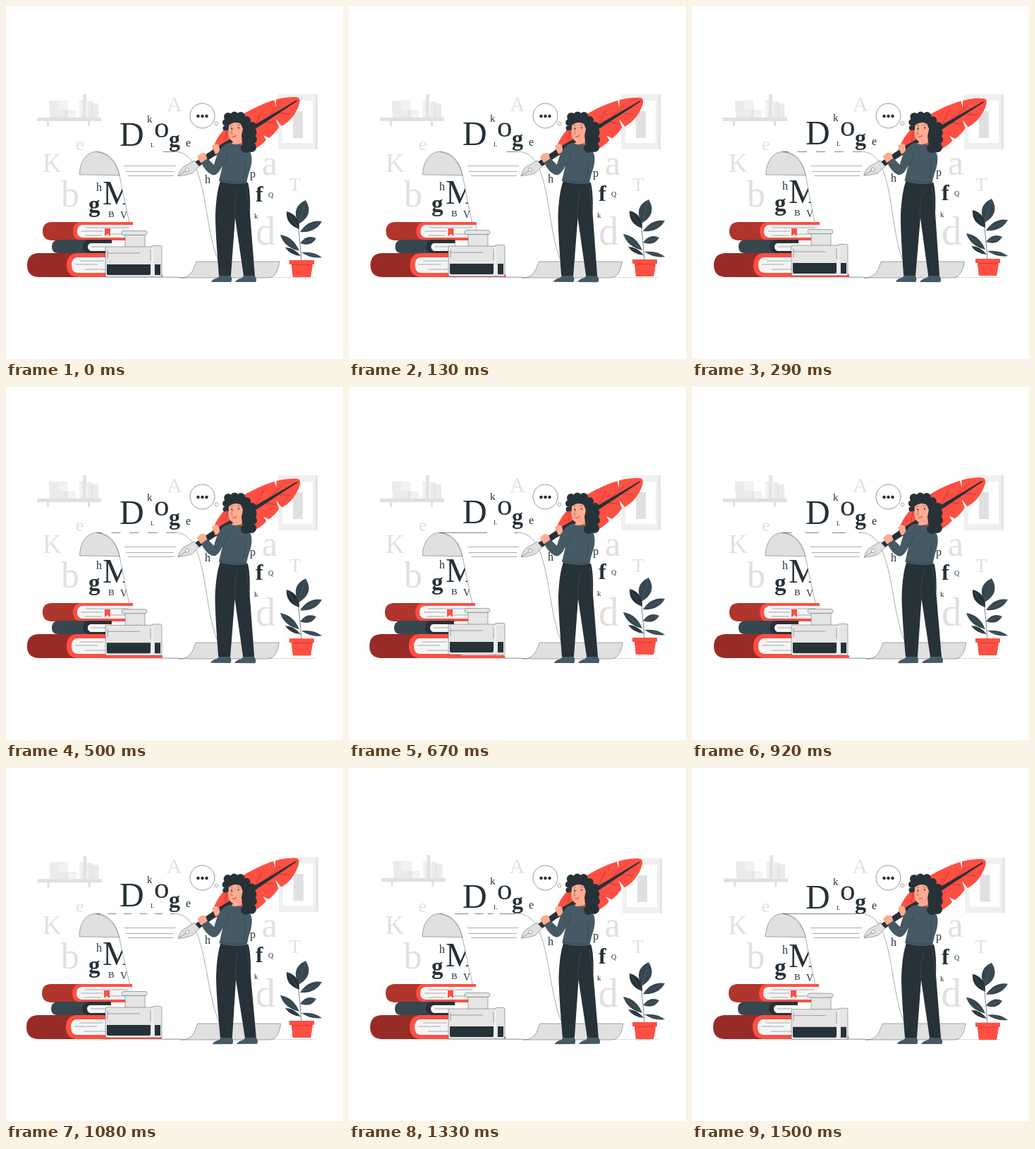
Write an HTML page that moves like this. It is 478x500 px and loops after 1.54 s.

```html
<!DOCTYPE html>
<html lang="en">
<head>
<meta charset="utf-8">
<style>
html, body { margin: 0; width: 100%; height: 100%; overflow: hidden; background: #fff; }
svg { display: block; width: 100vw; height: 100vh; }
text { font-family: "Liberation Serif", "Noto Serif", serif; }
.line { fill: none; stroke: #263238; stroke-width: .6; }
.thin { fill: none; stroke: #263238; stroke-width: .4; }
.edge { stroke: #263238; stroke-width: .4; }
</style>
</head>
<body>
<svg viewBox="0 0 478 500">
  <g id="shelf" fill="#ebebeb">
    <path fill="#e0e0e0" d="M44 158h91v5H44zM58 163h3v7h-3zM116 163h3v7h-3z"/>
    <path d="M61 134h26v14H61zM62 148h36v10H62zM104 134h10v24h-10zM115 135h8v23h-8zM123 138h8v20h-8z"/>
    <path fill="#e3e3e3" d="M84 148h3v10h-3zM109 125h5v33h-5zM121 138h2v20h-2z"/>
    <path fill="#f2f2f2" d="M74 135h12v12H74zM88 149h11v9H88zM104 136h4v21h-4z"/>
  </g>
  <g id="frame">
    <path fill="#f0f0f0" d="M386 125h56v78h-56z"/>
    <path fill="#e3e3e3" d="M439 125h3v78h-3z"/>
    <path fill="#fff" d="M392 134h43v60h-43z"/>
    <path fill="#e0e0e0" d="M407 149h14v38h-14z"/>
  </g>
  <g id="pale" fill="#e0e0e0"></g>
  <g id="dark" fill="#263238"></g>
  <path class="thin" d="M140 384.5H438" opacity=".45"/>

  <g id="paper">
    <path fill="#fff" d="M128 206H240C266 208 272 236 277 253C285 283 289 337 302 359L272 363C268 372 268 384 245 384H222C188 383 187 352 177 318C170 286 163 250 161 240C155 219 146 208 128 206Z"/>
    <path class="thin" d="M240 206C266 208 272 236 277 253C285 283 289 337 302 362M128 206C147 208 156 219 161 240C166 266 172 294 179 324M190 360Q202 384 222 384H246"/>
    <path id="top" class="line" d="M128 206.5H240"/>
    <path class="edge" fill="#e0e0e0" d="M104.500 239C104 222 114 206 128 206.500C145 208 157 222 161 240Q133 239 104.500 239Z"/>
    <path class="edge" fill="#e0e0e0" d="M270 362H388C387 371 383 385 372 385H246C264 385 266 372 270 362Z"/>
    <path class="thin" d="M168 226.500H241M170 234.500H238M173 240.500H238"/>
  </g>

  <g id="books">
    <path fill="#b0352c" d="M180 306H64Q52 307 52 319T64 332H180Z"/>
    <path fill="#ff4f43" d="M180 306H105Q95 308 95 319T105 332H180Z"/>
    <path fill="#f5f5f5" d="M180 310H108Q101 311 101 319T108 328H180Z"/>
    <path class="thin" d="M113 314H174M107 319H138M148 323H176M112 325H136"/>
    <path fill="#ff4f43" d="M140 315h8v11l-4-3-4 3z"/>
    <path fill="#37474f" d="M150 331H74Q65 332 65 341T74 350H150Z"/>
    <path fill="#263238" d="M150 331H118Q109 333 109 341T118 350H150Z"/>
    <path fill="#f5f5f5" d="M150 336H120Q116 337 116 341T120 347H150Z"/>
    <path class="thin" d="M121 341H142"/>
    <path fill="#992b26" d="M160 350H46Q30 351 30 367T46 384H160Z"/>
    <path fill="#ff4f43" d="M160 350H100Q86 352 86 367T100 384H222V380H160Z"/>
    <path fill="#f5f5f5" d="M160 356H101Q93 357 93 367T101 378H160Z"/>
    <path class="thin" d="M105 361H139M98 366H130M112 373H142"/>
  </g>

  <g id="bottle">
    <g class="edge" fill="#e5e5e5">
      <path d="M169 324H197V342H169Z"/>
      <rect x="164" y="318.500" width="36" height="6" rx="3"/>
      <rect x="141" y="341" width="67" height="43" rx="2"/>
      <rect x="207" y="339.500" width="14" height="44.500" rx="2"/>
    </g>
    <path fill="#f0f0f0" d="M206 342h3v41h-3z"/>
    <path fill="#263238" d="M143 366h62v13q0 2-2 2H145q-2 0-2-2zM211 366h8v15h-8z"/>
    <path class="thin" d="M144 350H190M144 346V358M205 345V361"/>
  </g>

  <g class="line">
    <circle cx="278.500" cy="155.500" r="17.500" stroke-width=".5" fill="#fff"/>
    <circle cx="298.500" cy="166.500" r="2.500" stroke-width=".4"/>
    <path stroke-width="4.500" stroke-linecap="round" d="M272.500 156h0M278.500 156h0M284.500 156h0"/>
  </g>

  <g id="feather">
    <path fill="#ff4f43" d="M292 212C293 190 312 166 342 150C367 136 393 127 414 129.500Q419 132 415 142C409 156 402 164 391 170L383 160L387 172Q381 181 373 187L365 183L369 190Q351 209 322 210Z"/>
    <path fill="#fff" d="M380 131L383 143L383 130Z"/>
    <path class="thin" d="M311 190L314 176M331 180L337 158M354 167L365 146M374 155L390 140M360 163L382 166M382 151L403 153"/>
    <path fill="#263238" d="M268 221L300 199L411 134L414 134L304 207L274 227Z"/>
    <path class="edge" fill="#e0e0e0" d="M244 241Q247 229 255 226L267 219L274 227L264 237Q255 240 244 241Z"/>
    <path class="thin" d="M245 240L256 233"/>
    <circle class="edge" cx="257" cy="232" r="2.500" fill="#fff"/>
  </g>

  <g id="woman">
    <path fill="#455a64" d="M304 381H318Q322 387 319 391H291Q292 387 300 385ZM338 381H352Q357 387 354 391H325Q327 387 335 385Z"/>
    <path fill="#263238" d="M304 248L343 250Q347 263 346 293L353 382H337L325 300L319 382H302C299 344 297 315 297 297Q298 265 304 248Z"/>
    <path fill="none" stroke="#455a64" stroke-width=".5" d="M325 300Q323 278 329 260M341 256L345 290"/>
    <path fill="#ffab91" d="M271 214Q276 206 283 209L286 218Q282 224 276 222ZM292 199Q296 193 302 197L304 207L297 210Z"/>
    <path fill="#455a64" d="M316 194Q334 192 346 206Q352 217 344 238L341 251Q320 254 302 248L307 226Q300 242 292 239Q283 235 277 222L286 216L295 225Q302 197 316 194Z"/>
    <path class="thin" d="M307 226Q313 219 315 208M304 246Q322 251 341 249M338 219Q341 231 337 242"/>
    <g id="hair" fill="#263238">
      <path d="M311 158Q325 148 342 160L354 180L350 206L337 203L334 170L314 176Z"/>
    </g>
    <path fill="#ffab91" d="M316 169Q325 162 333 167L336 174L334 184L335 193Q328 198 320 195L322 192Q315 188 315.500 179Z"/>
    <path class="thin" d="M318 170l4-1M327 168l5 1M322 173l-3 7 3 1"/>
    <path fill="none" stroke="#263238" stroke-width="1.600" stroke-linecap="round" d="M320 173v1M330 172v1"/>
    <path fill="none" stroke="#d83a30" d="M321 185q4 1 6-2"/>
  </g>

  <g id="plant">
    <path class="line" stroke-width="1.200" d="M419 361Q417 334 415 317L416 303"/>
    <g id="leaves"></g>
    <path fill="#d83a30" d="M405 364H435L432 384H407Z"/>
    <path fill="#ff4f43" d="M402 360H437V366H402ZM405 367H435L432 384H407Z"/>
  </g>
</svg>
<script>
const $ = id => document.getElementById(id);

// letter, x, baseline, size; the last entry marks bold
const letters = rows => rows.trim().split("\n").map(row => {
  const [char, x, y, size, bold] = row.trim().split(" ");
  return `<text x="${x}" y="${y}" font-size="${size}"${bold ? ' font-weight="700"' : ""}>${char}</text>`;
}).join("");

$("pale").innerHTML = letters(`
  A 228 149 30
  K 52 235 37
  e 99 204 26
  b 78 284 52
  a 363 239 50
  T 402 262 27
  d 354 338 57`);
$("dark").innerHTML = letters(`
  D 161 198 48
  k 200 165 15
  o 210 186 43
  g 231 199 32 b
  e 255 199 16
  L 205 200 9
  h 128 262 16
  M 137 281 48
  g 117 292 33 b
  B 145 299 13
  V 162 301 14
  h 282 251 16
  p 346 243 16
  f 354 277 32 b
  Q 372 271 10
  k 352 301 11`);

const curls = [[315,157,6], [324,155,5.5], [333,156,6], [341,162,6], [312,165,5], [311,173,3.5],
  [349,170,6], [347,179,8.5], [350,189,6], [342,190,8], [340,201,7], [348,200,7]];
$("hair").innerHTML += curls.map(([x, y, r]) => `<circle cx="${x}" cy="${y}" r="${r}"/>`).join("");

const leaf = (x, y, tipX, tipY, width, fill) => {
  const dx = tipX - x, dy = tipY - y, k = width / Math.hypot(dx, dy);
  const side = s => `${x + dx * .55 - dy * k * s} ${y + dy * .55 + dx * k * s}`;
  return `<path fill="${fill}" d="M${x} ${y}Q${side(1)} ${tipX} ${tipY}Q${side(-1)} ${x} ${y}"/>
    <path fill="none" stroke="#607d8b" stroke-width=".4" d="M${x} ${y}L${tipX} ${tipY}"/>`;
};
$("leaves").innerHTML =
  leaf(415, 309, 425, 275, 18, "#37474f") + leaf(416, 316, 398, 291, 12, "#263238") +
  leaf(417, 320, 448, 305, 11, "#37474f") + leaf(416, 347, 389, 324, 10, "#37474f") +
  leaf(417, 336, 440, 329, 10, "#37474f") + leaf(418, 354, 396, 342, 6, "#263238") +
  leaf(419, 349, 448, 356, 6, "#37474f");

const loop = 1540, times = [0, 290, 670, 920, 1080, 1330, 1500, loop];
const tracks = {
  bob: [0, -2, -5, -4, -2, 0, .7],
  sway: [0, -2, 0, 1, 2, 1, 0],
  books: [0, 1, -1, 1, -1, 0, 0],
  wall: [0, 0, 0, 0, .4, 1, .8]
};
const topDashes = ["0 95 17", "8 5", "68 38 9", "14 5", "7 4", "0 22 20 9 12 6 8 9", "112"];

function draw(now) {
  const t = now % loop;
  const i = times.findIndex((start, n) => t >= start && t < times[n + 1]);
  const u = (t - times[i]) / (times[i + 1] - times[i]);
  const at = track => track[i] + (track[(i + 1) % track.length] - track[i]) * u;
  const set = (id, value) => $(id).setAttribute("transform", value);
  const bob = at(tracks.bob), sway = at(tracks.sway), wall = at(tracks.wall);

  for (const id of ["plant", "bottle", "dark"]) set(id, `translate(0 ${bob})`);
  set("books", `translate(${at(tracks.books)} 0)`);
  set("woman", `rotate(${-.29 * sway} 325 195)`);
  set("feather", `rotate(${-.4 * sway} 290 215)`);
  set("paper", `translate(0 260) skewX(${.46 * sway}) translate(0 -260)`);
  set("shelf", `translate(${wall * 1.5} ${-wall * 2})`);
  set("frame", `translate(${wall * 2} ${wall * 3})`);
  set("pale", `translate(${-wall * .5} ${wall * .5})`);
  $("top").setAttribute("stroke-dasharray", topDashes[i] + " 0");
  requestAnimationFrame(draw);
}
requestAnimationFrame(draw);
</script>
</body>
</html>
```
